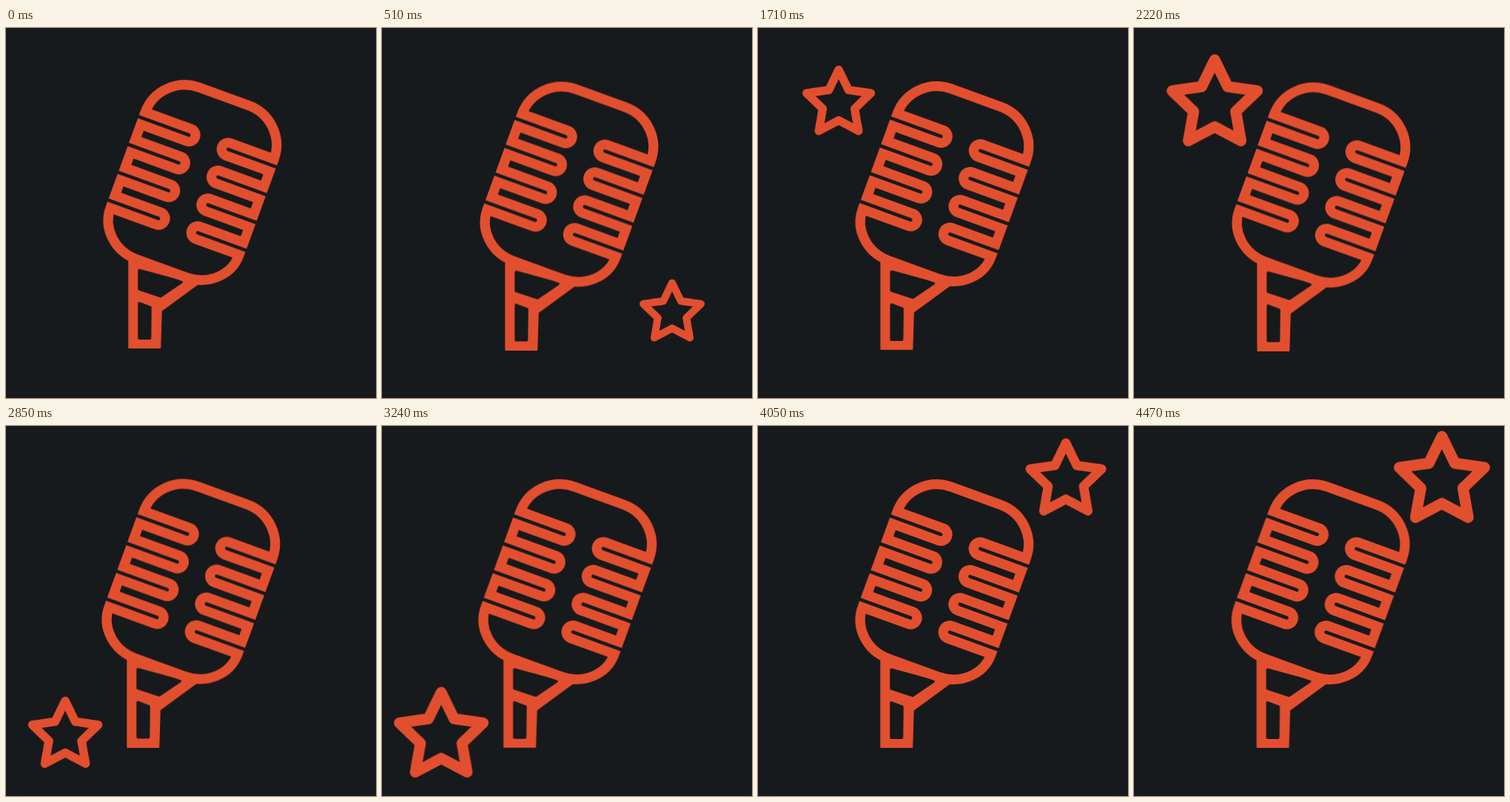
Recreate the animation shown at these times as an HTML page. Size 500 px wide and 500 px high, loop 4.5 s.

```html
<!DOCTYPE html>
<html lang="en">
<head>
<meta charset="utf-8">
<title>Microphone and stars</title>
<style>
  html, body { margin: 0; width: 100%; height: 100%; overflow: hidden; background: #171a1c; }
  svg { display: block; width: 100vw; height: 100vh; }
  path { stroke-linejoin: round; }
  .line { fill: none; stroke: #e24f2f; }
  .solid { fill: #e24f2f; stroke: #e24f2f; stroke-width: 2; }
  .hole { fill: #171a1c; stroke: #171a1c; stroke-width: 4; }
  #body { stroke-width: 13.2; stroke-linejoin: miter; }
</style>
</head>
<body>
<svg viewBox="0 0 500 500">
  <g id="mic">
    <path class="solid" d="M166.300 313V432H208.300L209.800 382L259 346L250 340Z"/>
    <path class="hole" d="M180.300 327.500L237 343L209 362L180.300 352.500Z"/>
    <path class="hole" d="M180.300 372L194.800 377.500L194.300 419H180.300Z"/>
    <path id="body" class="line" transform="translate(251.7 210) rotate(20)"/>
  </g>
  <g id="stars"></g>
</svg>
<script>
const LOOP = 4500;
const NS = 'http://www.w3.org/2000/svg';

// Capsule outline with evenly spaced slots cut in from each side
function bodyPath() {
  const side = 92.6, flat = 35.5, top = -125.2, bottom = 122;
  const tip = 28.2, lean = 1.6, r = 8.9, pitch = 40;
  const rows = [0, 1, 2, 3].map(i => (i - 1.5) * pitch);
  const edge = 1.5 * pitch + r;
  const slot = (sign, y) => {
    const x = sign * tip + lean, from = y - sign * r, to = y + sign * r;
    return `L${sign * side} ${from}H${x}A${r} ${r} 0 0 0 ${x} ${to}H${sign * side}`;
  };
  const arc = (end, x, y) => `A${side - flat} ${Math.abs(end) - edge} 0 0 1 ${x} ${y}`;
  return `M${-flat} ${top}H${flat}` + arc(top, side, -edge) +
    rows.map(y => slot(1, y)).join('') +
    arc(bottom, flat, bottom) + `H${-flat}` + arc(bottom, -side, edge) +
    rows.reverse().map(y => slot(-1, y)).join('') +
    arc(top, -flat, top) + 'Z';
}

function starPath(outer = 60.5, inner = 30, cy = 5.8) {
  const points = Array.from({ length: 10 }, (_, i) => {
    const r = i % 2 ? inner : outer, a = i * Math.PI / 5;
    return `${(r * Math.sin(a)).toFixed(2)} ${(cy - r * Math.cos(a)).toFixed(2)}`;
  });
  return 'M' + points.join('L') + 'Z';
}

// Stars take equal turns: each grows, then vanishes as the next begins
function addStar([x, y], i, all) {
  const first = 30, turn = (LOOP - first) / all.length;
  const start = first + i * turn;
  const group = document.createElementNS(NS, 'g');
  const star = document.createElementNS(NS, 'path');
  group.setAttribute('transform', `translate(${x} ${y})`);
  star.setAttribute('class', 'line');
  star.setAttribute('stroke-width', 15);
  star.setAttribute('d', starPath());
  group.append(star);
  document.getElementById('stars').append(group);
  const key = (time, scale, easing = 'linear') =>
    ({ offset: Math.min(time / LOOP, 1), transform: `scale(${scale})`, easing });
  star.animate([
    key(0, 0),
    key(start, 0, 'cubic-bezier(.333, .667, .667, 1)'),
    key(start + turn, 1),
    key(start + turn, 0),
    key(LOOP, 0)
  ], { duration: LOOP, iterations: Infinity });
}

document.getElementById('body').setAttribute('d', bodyPath());
[[392, 381.5], [109, 97.7], [80, 413.8], [416, 68.8]].forEach(addStar);

// Gentle drift: time, dx, dy
const drift = [
  [0, 0, 0], [250, -4, 2.8], [510, 1, 2.5], [1230, -0.7, 0.5],
  [2220, 1, 3.5], [2850, -2, 1.5], [3630, -0.5, 2], [LOOP, 0.3, 2]
];
document.getElementById('mic').animate(
  drift.map(([time, x, y]) => ({
    offset: time / LOOP, transform: `translate(${x}px, ${y}px)`, easing: 'ease-in-out'
  })),
  { duration: LOOP, iterations: Infinity }
);

// All clocks start together
document.getAnimations().forEach(a => { a.startTime = document.timeline.currentTime; });
</script>
</body>
</html>
```
